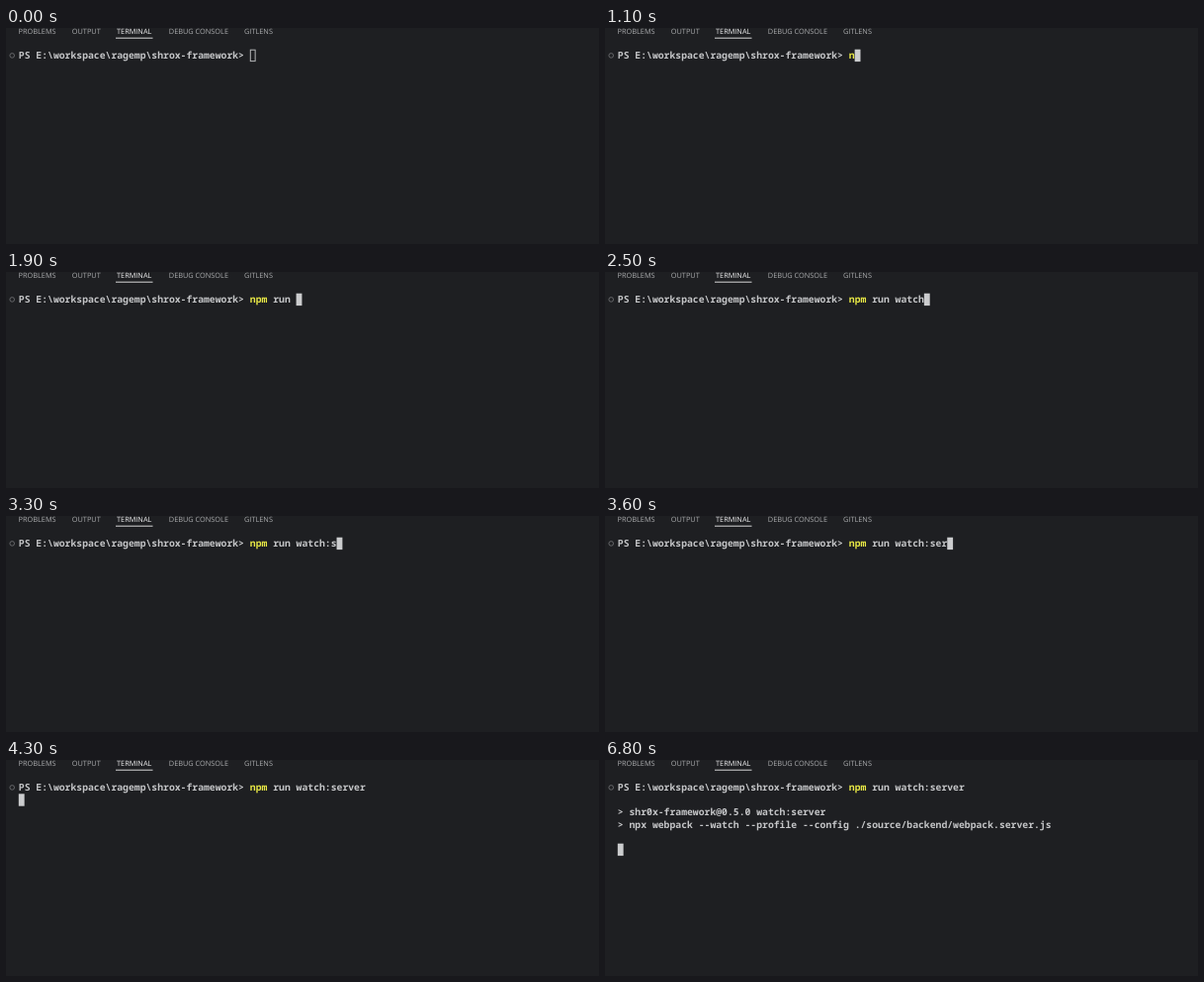
These frames come from a looping animation (600x219 px, 8000 ms). An HTML page:

```html
<!DOCTYPE html>
<html lang="en">
<head>
<meta charset="utf-8">
<title>Terminal</title>
<style>
  html, body { margin: 0; width: 100%; height: 100%; overflow: hidden; background: #1e1f22; }
  svg { display: block; width: 600px; height: 219px; }
  text { white-space: pre; text-rendering: geometricPrecision; }
  .tab { font: 7.35px "Open Sans", "Noto Sans", sans-serif; fill: #aaabad; }
  .active { fill: #f0f0f1; }
  .line { font: 550 9.75px "Noto Sans Mono", "DejaVu Sans Mono", monospace; fill: #c4c5c7; font-variant-ligatures: none; }
  .command { fill: #e6e645; }
</style>
</head>
<body>
<svg id="stage" viewBox="0 0 600 219" xmlns="http://www.w3.org/2000/svg">
  <rect width="600" height="219" fill="#1e1f22"/>
  <g id="tabs"></g>
  <rect x="111" y="9.7" width="37.5" height="1" fill="#d6d6d8"/>
  <circle cx="6.2" cy="27.9" r="2.3" fill="none" stroke="#66676a"/>
  <text class="line" x="12.8" y="31"><tspan id="prompt"></tspan><tspan id="command" class="command"></tspan><tspan id="args"></tspan></text>
  <g id="output"></g>
  <rect id="cursor"/>
</svg>
<script>
const LOOP = 8000, LEFT = 12.8, CELL = 5.85, BASELINE = 31, LINE_HEIGHT = 12.6;
const CURSOR_TOP = 21.7, CURSOR_HEIGHT = 12.4;
const FOCUS = 200, ENTER = 4300, RESPONSE = 6800;
const PROMPT = "PS E:\\workspace\\ragemp\\shrox-framework> ";
const INPUT = "npm run watch:server";
const COMMAND_LENGTH = 3;
const TABS = [["PROBLEMS", 12.6], ["OUTPUT", 66.8], ["TERMINAL", 112], ["DEBUG CONSOLE", 164.8], ["GITLENS", 241]];
const OUTPUT = [
  "> shr0x-framework@0.5.0 watch:server",
  "> npx webpack --watch --profile --config ./source/backend/webpack.server.js"
];
// [time in ms, characters typed so far]
const KEYS = [
  [1100, 1], [1200, 2], [1400, 3], [1600, 4], [1700, 6], [1800, 7], [1900, 8], [2000, 10],
  [2200, 11], [2400, 12], [2500, 13], [2800, 14], [3300, 15], [3400, 16], [3600, 17],
  [3800, 18], [3900, 19], [4000, 20]
];

const byId = id => document.getElementById(id);
const [command, args, output, cursor] = ["command", "args", "output", "cursor"].map(byId);

function setAttributes(node, values) {
  for (const name in values) node.setAttribute(name, values[name]);
}

function addText(parent, content, x, y, className) {
  const node = document.createElementNS("http://www.w3.org/2000/svg", "text");
  setAttributes(node, { x, y, class: className });
  node.textContent = content;
  parent.append(node);
}

function placeCursor(column, row, focused) {
  const inset = focused ? 0 : 0.5;
  setAttributes(cursor, {
    x: LEFT + column * CELL + inset,
    y: CURSOR_TOP + row * LINE_HEIGHT + inset,
    width: CELL - 2 * inset,
    height: CURSOR_HEIGHT - 2 * inset,
    fill: focused ? "#cbccce" : "none",
    stroke: focused ? "none" : "#b4b5b7"
  });
}

function render(time) {
  const typed = KEYS.reduce((count, [at, total]) => time >= at ? total : count, 0);
  command.textContent = INPUT.slice(0, Math.min(typed, COMMAND_LENGTH));
  args.textContent = INPUT.slice(COMMAND_LENGTH, Math.max(typed, COMMAND_LENGTH));
  output.setAttribute("visibility", time >= RESPONSE ? "visible" : "hidden");
  if (time >= RESPONSE) placeCursor(0, 5, true);
  else if (time >= ENTER) placeCursor(0, 1, true);
  else placeCursor(PROMPT.length + typed, 0, time >= FOCUS);
}

TABS.forEach(([label, x]) => addText(byId("tabs"), label, x, 6, label === "TERMINAL" ? "tab active" : "tab"));
OUTPUT.forEach((content, i) => addText(output, content, LEFT, BASELINE + (i + 2) * LINE_HEIGHT, "line"));
byId("prompt").textContent = PROMPT;

const start = performance.now();
function tick() {
  render((performance.now() - start) % LOOP);
  requestAnimationFrame(tick);
}
tick();
</script>
</body>
</html>
```
